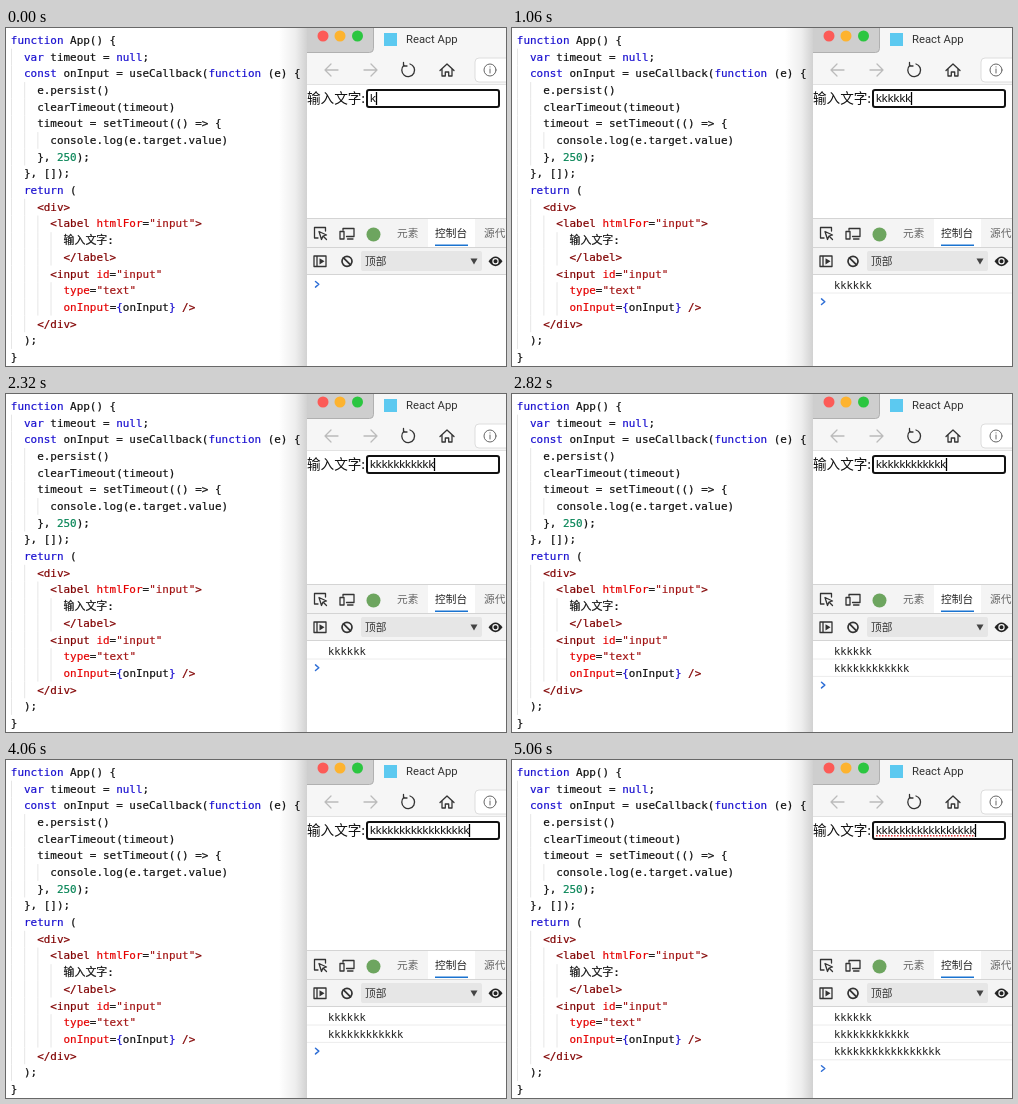
These frames come from a looping animation (500 by 338 pixels, 5130 ms). An HTML page:

```html
<!DOCTYPE html>
<html lang="zh">
<head>
<meta charset="utf-8">
<title>Debounced input</title>
<style>
  html, body { margin: 0; width: 100%; height: 100%; overflow: hidden; background: #fff; }
  svg { display: block; width: 500px; height: 338px; }
  text { white-space: pre; }
  .code { font: 10.95px "DejaVu Sans Mono", "Noto Sans CJK SC", monospace; color: #111; }
  .code, .code tspan { fill: currentColor; stroke: currentColor; stroke-width: .2; }
  .kw { color: #1a10d0; }
  .str { color: #a31515; }
  .tag { color: #800000; }
  .attr { color: #e50000; }
  .num { color: #098658; }
  .ui { font: 10.7px "Noto Sans CJK SC", "Noto Sans CJK", sans-serif; fill: #666; }
  .title { font: 11.3px Roboto, sans-serif; fill: #333; }
  .label { font: 13.6px "Noto Sans CJK SC", "Noto Sans CJK", sans-serif; fill: #111; }
  .field { font: 11.7px "Liberation Sans", Arial, sans-serif; fill: #111; }
  .log { font: 10.45px "DejaVu Sans Mono", monospace; fill: #222; }
  .icon { fill: none; stroke: #333; stroke-width: 1.3; stroke-linecap: round; stroke-linejoin: round; }
</style>
</head>
<body>
<svg viewBox="0 0 500 338">
  <defs>
    <linearGradient id="shade">
      <stop offset="0" stop-opacity="0"/>
      <stop offset=".6" stop-opacity=".07"/>
      <stop offset="1" stop-opacity=".18"/>
    </linearGradient>
  </defs>
  <rect width="500" height="338" fill="#fff"/>
  <rect x="273" width="28" height="338" fill="url(#shade)"/>
  <g id="code"></g>

  <!-- browser window -->
  <rect x="301" width="199" height="338" fill="#fff"/>
  <rect x="301" width="199" height="57" fill="#f6f6f6"/>
  <path d="M301 0H367.5V20.5Q367.5 24.5 363.5 24.5H301Z" fill="#cecece"/>
  <path d="M367.5 0V20.5Q367.5 24.5 363.5 24.5H301" fill="none" stroke="#b0b0b0"/>
  <circle cx="317" cy="8" r="5.5" fill="#fc5b57"/>
  <circle cx="334" cy="8" r="5.5" fill="#fdb32f"/>
  <circle cx="351.5" cy="8" r="5.5" fill="#2bc640"/>
  <rect x="378" y="5" width="13" height="13" fill="#5cc9f0"/>
  <text class="title" x="400" y="15">React App</text>
  <g class="icon">
    <path stroke="#bbb" d="M332 42H319M325 36L319 42L325 48M358 42H371M365 36L371 42L365 48"/>
    <path d="M398 37.3A6.4 6.4 0 1 0 404 36M397.5 34.5V38H401"/>
    <path d="M434 42.5L441 36L448 42.5M436 41V48H439.3V44H442.7V48H446V41"/>
  </g>
  <path d="M500 30H473Q469 30 469 34V50Q469 54 473 54H500" fill="#fff" stroke="#ddd"/>
  <g class="icon" style="stroke:#666;stroke-width:1">
    <circle cx="484" cy="42" r="6"/>
    <path d="M484 41V45M484 38.8V39"/>
  </g>
  <path d="M301 56.5H500" stroke="#e2e2e2"/>

  <!-- page -->
  <text class="label" x="301" y="75">输入文字:</text>
  <rect x="361" y="62" width="132" height="17" rx="2" fill="#fff" stroke="#111" stroke-width="2"/>
  <text class="field" id="field" x="364" y="74"></text>
  <path id="caret" d="M0 64V77" stroke="#000" stroke-width="1.3"/>
  <path id="spell" d="M364 75.8H463" stroke="#e23b3b" stroke-width="1.4" stroke-dasharray="1.5 1.5"/>

  <!-- developer tools -->
  <rect x="301" y="190" width="199" height="56" fill="#f4f4f4"/>
  <path d="M301 190.5H500M301 219.5H500M301 246.5H500" stroke="#d4d4d4"/>
  <rect x="422" y="191" width="47" height="28" fill="#fff"/>
  <rect x="429" y="216.5" width="33" height="1.5" fill="#1a73d0"/>
  <g class="icon">
    <path d="M312 210H308.5V199.5H319.5V203M313 203.5L320.5 207L317 208L315.5 211.5ZM317.5 208.5L320.5 211.5"/>
    <path d="M337 202V200.5H348V208.5H340.5M341.5 211H347M334 203.5H338V211H334Z"/>
    <path d="M308 228H320V238.5H308ZM311 228V238.5"/>
    <g stroke-width="1.7">
      <circle cx="341" cy="233.3" r="5"/>
      <path d="M337.5 229.8L344.5 236.8"/>
    </g>
  </g>
  <path d="M313.5 230.2L318.5 233.3L313.5 236.4Z" fill="#333"/>
  <path d="M482.5 233.3Q489.5 223.5 496.5 233.3Q489.5 243 482.5 233.3Z" fill="#222"/>
  <circle cx="489.5" cy="233.3" r="2.6" fill="#222" stroke="#f4f4f4" stroke-width="1.2"/>
  <circle cx="367.5" cy="206.5" r="7" fill="#6da55f"/>
  <text class="ui" x="391" y="209">元素</text>
  <text class="ui" x="429" y="209" style="fill:#222">控制台</text>
  <text class="ui" x="478" y="209">源代</text>
  <rect x="355" y="223" width="121" height="20" rx="2" fill="#e6e6e6"/>
  <text class="ui" x="359" y="237" style="fill:#333">顶部</text>
  <path d="M464.5 230.5H471.5L468 236.5Z" fill="#444"/>
  <g id="logs"></g>
  <path id="prompt" class="icon" style="stroke:#2f6fd6;stroke-width:1.5" d="M309.5 253.5L312.8 256.3L309.5 259.1"/>
</svg>
<script>
const LOOP = 5130, ROW = 17.4, LINE = 16.68, COL = 6.59, CHAR = 5.85;
const DELAY = 250, SPELL_AT = 4900;
const keys = [0, 140, 280, 420, 560, 700,
  1565, 1742, 1900, 2090, 2270, 2450,
  3390, 3540, 3710, 3870, 4030];
const source = `function App() {
  var timeout = null;
  const onInput = useCallback(function (e) {
    e.persist()
    clearTimeout(timeout)
    timeout = setTimeout(() => {
      console.log(e.target.value)
    }, 250);
  }, []);
  return (
    <div>
      <label htmlFor="input">
        输入文字:
        </label>
      <input id="input"
        type="text"
        onInput={onInput} />
    </div>
  );
}`;
const token = /=>|(?<str>"[^"]*")|(?<tag><\/?\w+>?|\/?>)|(?<attr>\w+(?==))|(?<kw>\b(?:function|var|null|const|return)\b|(?<==)\{|\}(?= \/))|(?<num>\b\d+)/g;
const $ = id => document.getElementById(id);
const esc = s => s.replace(/</g, '&lt;').replace(/>/g, '&gt;');

function highlight(line) {
  let html = '', last = 0;
  for (const m of line.matchAll(token)) {
    const kind = Object.keys(m.groups).find(k => m.groups[k]) || '';
    html += esc(line.slice(last, m.index)) + `<tspan class="${kind}">${esc(m[0])}</tspan>`;
    last = m.index + m[0].length;
  }
  return html + esc(line.slice(last));
}

$('code').innerHTML = source.split('\n').map((line, i) => {
  const y = 16 + i * LINE, indent = line.search(/\S/);
  let guides = '';
  for (let c = 0; c < indent; c += 2) {
    guides += `<path d="M${5.5 + c * COL} ${y - 12}v${LINE}" stroke="#e6e6e6"/>`;
  }
  return guides + `<text class="code" x="${4.8 + indent * COL}" y="${y}">${highlight(line.trim())}</text>`;
}).join('');

// A value is logged once no key follows within the delay.
const logs = keys
  .map((at, i) => ({ at: at + DELAY, size: i + 1, next: keys[i + 1] ?? Infinity }))
  .filter(l => l.next > l.at);

$('logs').innerHTML = logs.map((l, i) => `<g>
  <text class="log" x="322" y="${260.5 + i * ROW}">${'k'.repeat(l.size)}</text>
  <path d="M301 ${265 + i * ROW}H500" stroke="#ececec"/></g>`).join('');
const rows = [...$('logs').children];
const show = (el, on) => el.setAttribute('visibility', on ? 'visible' : 'hidden');

function draw(t) {
  const count = keys.filter(k => k <= t).length;
  $('field').textContent = 'k'.repeat(count);
  $('caret').setAttribute('transform', `translate(${Math.round(364 + count * CHAR) + .5})`);
  show($('caret'), (t - keys[count - 1]) % 1000 < 500);
  show($('spell'), t >= SPELL_AT);
  rows.forEach((row, i) => show(row, t >= logs[i].at));
  const done = logs.filter(l => t >= l.at).length;
  $('prompt').setAttribute('transform', `translate(0 ${done * ROW})`);
}

const start = performance.now();
function tick() {
  draw((performance.now() - start) % LOOP);
  requestAnimationFrame(tick);
}
tick();
</script>
</body>
</html>
```
